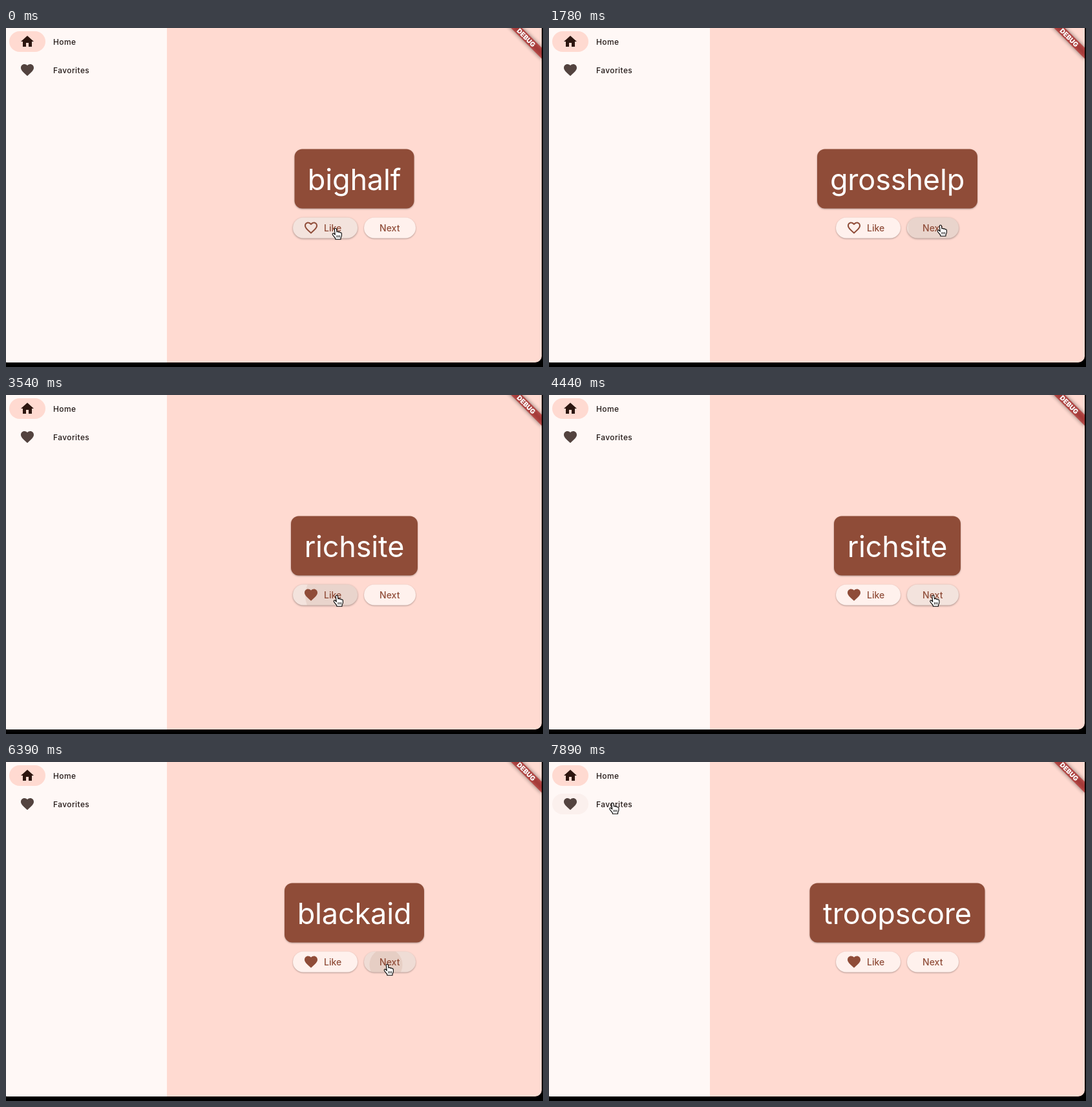
An HTML page that plays this animation: 831x525 px, repeating every 8 s.

```html
<!DOCTYPE html>
<html lang="en">
<head>
<meta charset="utf-8">
<title>Word pairs</title>
<style>
html, body { margin: 0; width: 100%; height: 100%; overflow: hidden; background: #000; }
svg { display: block; width: 831px; height: 525px; font-family: Inter, Roboto, sans-serif; }
.nav { font-size: 12px; font-weight: 500; letter-spacing: .4px; fill: #231917; }
.btn { font-size: 14px; font-weight: 500; letter-spacing: .05px; fill: #8f4c38; }
.low { filter: drop-shadow(0 1px .8px rgba(0, 0, 0, .3)); }
.high { filter: drop-shadow(0 1.8px 1.6px rgba(0, 0, 0, .36)); }
</style>
</head>
<body>
<svg viewBox="0 0 831 525">
  <defs>
    <clipPath id="win"><rect x="-7" y="-20" width="836" height="538" rx="10"/></clipPath>
    <clipPath id="clipLike"><rect x="444" y="293.5" width="100" height="32" rx="16"/></clipPath>
    <clipPath id="clipNext"><rect x="554" y="293.5" width="80" height="32" rx="16"/></clipPath>
    <filter id="soft" x="-20%" y="-100%" width="140%" height="300%"><feGaussianBlur stdDeviation="3"/></filter>
    <path id="heart" d="M12 21.35l-1.45-1.32C5.4 15.36 2 12.28 2 8.5 2 5.42 4.42 3 7.5 3c1.74 0 3.41.81 4.5 2.09C13.09 3.81 14.76 3 16.5 3 19.58 3 22 5.42 22 8.5c0 3.78-3.4 6.86-8.55 11.54z"/>
    <path id="heartLine" d="M16.5 3c-1.74 0-3.41.81-4.5 2.09C10.91 3.81 9.24 3 7.5 3 4.42 3 2 5.42 2 8.5c0 3.78 3.4 6.86 8.55 11.54L12 21.35l1.45-1.32C18.6 15.36 22 12.28 22 8.5 22 5.42 19.58 3 16.5 3zm-4.4 15.55l-.1.1-.1-.1C7.14 14.24 4 11.39 4 8.5 4 6.5 5.5 5 7.5 5c1.54 0 3.04.99 3.57 2.36h1.87C13.46 5.99 14.96 5 16.5 5c2 0 3.5 1.5 3.5 3.5 0 2.89-3.14 5.74-7.9 10.05z"/>
  </defs>
  <g clip-path="url(#win)">
    <rect width="831" height="525" fill="#ffdad1"/>
    <rect width="249" height="525" fill="#fff8f6"/>
    <rect x="5" y="5" width="56" height="32" rx="16" fill="#ffdad1"/>
    <rect id="favPill" x="5" y="49" width="56" height="32" rx="16" fill="#fbf0ed"/>
    <path transform="translate(21 9)" fill="#2c150f" d="M10 20v-6h4v6h5v-8h3L12 3 2 12h3v8z"/>
    <use href="#heart" transform="translate(21 53)" fill="#53433f"/>
    <text class="nav" x="73" y="26">Home</text>
    <text class="nav" x="73" y="70">Favorites</text>

    <rect id="card" class="low" y="187.5" height="92" rx="12" fill="#8f4c38"/>
    <text id="word" x="539" y="250.5" text-anchor="middle" font-size="45" letter-spacing="-.15" fill="#fff"></text>

    <rect id="like" x="444" y="293.5" width="100" height="32" rx="16"/>
    <rect id="next" x="554" y="293.5" width="80" height="32" rx="16"/>
    <g id="inkClip"><circle id="ink" fill="#8f4c38"/></g>
    <use id="icon" href="#heartLine" transform="translate(460 297.5)" fill="#8f4c38"/>
    <text class="btn" x="492" y="314.5">Like</text>
    <text class="btn" x="578" y="314.5">Next</text>

    <g transform="translate(829 -9) rotate(45)">
      <rect x="-40" y="28" width="80" height="12" fill="#000" opacity=".5" filter="url(#soft)"/>
      <rect x="-40" y="28" width="80" height="12" fill="#b71c1c" opacity=".63"/>
      <text y="37.7" text-anchor="middle" font-size="10.2" font-weight="900" fill="#fff">DEBUG</text>
    </g>
  </g>
  <g id="hand">
    <path fill="#fff" stroke="#000" stroke-width="1.1" stroke-linejoin="round" d="M-1.7 1.6C-1.7-.2 1.2-.3 1.4 1.5L2 6C2.4 5 4.5 5 4.8 6.4 5.4 5.6 7.1 5.8 7.3 7.1 8 6.5 9.4 6.9 9.4 8.4V11.6C9.4 13.2 8 14.2 8 15.8V17.2H-.2V16C-1 14.2-3.4 12.4-4.6 9.9-5.3 8.2-3.5 7.3-2.3 8.5L-.7 10.2Z"/>
    <path fill="none" stroke="#000" stroke-width=".9" d="M2 11v3.4M4.2 11v3.4M6.4 11v3.4"/>
  </g>
</svg>
<script>
const LOOP = 8000;
const $ = id => document.getElementById(id);
const set = (id, attrs) => {
  for (const k in attrs) $(id).setAttribute(k, attrs[k]);
};

// start time, text, card width
const words = [
  [0, 'bighalf', 185], [1050, 'nightspoke', 276], [1630, 'grosshelp', 248],
  [2230, 'richsite', 196], [4890, 'blackaid', 216], [6540, 'troopscore', 271]
];
// time, liked
const likes = [[0, 0], [3540, 1], [4890, 0], [5490, 1], [6540, 0], [6990, 1]];
// press times
const presses = [900, 1480, 2080, 3390, 4740, 6390, 6990];
// time, fingertip x, y
const path = [
  [0, 510, 310], [600, 606, 305], [2680, 606, 305], [3090, 512, 310],
  [3840, 512, 310], [4440, 594.5, 310], [4890, 594.5, 310], [5340, 518, 311],
  [5490, 520, 312], [5940, 520, 312], [6240, 590, 312], [6540, 590, 314],
  [6840, 514, 319], [6990, 510.5, 317], [7140, 510.5, 317],
  [7740, 122, 43], [7890, 98.5, 63], [LOOP, 98.5, 63]
];

const last = (list, t) => list.filter(e => e[0] <= t).pop();

function snap(t) {
  const shift = t < 1180 ? 0 : t < 3090 ? 130 : 90;
  return Math.floor((t - shift) / 150) * 150 + shift;
}

function tip(t) {
  const i = path.findIndex(p => p[0] > t);
  const [t0, x0, y0] = path[i - 1], [t1, x1, y1] = path[i];
  const u = (t - t0) / (t1 - t0);
  const e = u * u * (3 - 2 * u);
  return [x0 + (x1 - x0) * e, y0 + (y1 - y0) * e];
}

function button(id, hover, pressed) {
  set(id, {
    fill: !hover ? '#fff1ed' : pressed ? '#efdcd5' : '#f3e3dd',
    class: hover && !pressed ? 'high' : 'low'
  });
}

function draw(time) {
  const t = snap(time);
  const [x, y] = tip(t);
  const inRow = y > 293 && y < 326;
  const onLike = inRow && x > 444 && x < 544;
  const onNext = inRow && x > 554 && x < 634;

  const [, text, width] = last(words, t);
  $('word').textContent = text;
  set('card', { x: 539 - width / 2, width });
  set('icon', { href: last(likes, t)[1] ? '#heart' : '#heartLine' });

  const press = presses.filter(p => p <= t).pop() ?? -LOOP;
  const age = t - press;
  button('like', onLike, age < 150);
  button('next', onNext, age < 150);

  const [px, py] = tip(Math.max(press, 0));
  const isNext = px > 549;
  const grow = Math.min(age / 300, 1);
  const pull = grow * .55;
  set('inkClip', { 'clip-path': `url(#clip${isNext ? 'Next' : 'Like'})` });
  set('ink', {
    cx: px - 2 + ((isNext ? 594 : 494) - px + 2) * pull,
    cy: py + 1 + (309.5 - py - 1) * pull,
    r: 25.5 + (isNext ? 17.5 : 34) * grow,
    opacity: age < 450 ? .1 : age < 600 ? .05 : 0
  });

  set('favPill', { opacity: x < 249 && y > 43 && y < 87 ? 1 : 0 });
  set('hand', { transform: `translate(${x.toFixed(1)} ${y.toFixed(1)})` });
}

const start = performance.now();
function tick() {
  draw((performance.now() - start) % LOOP);
  requestAnimationFrame(tick);
}
tick();
</script>
</body>
</html>
```
